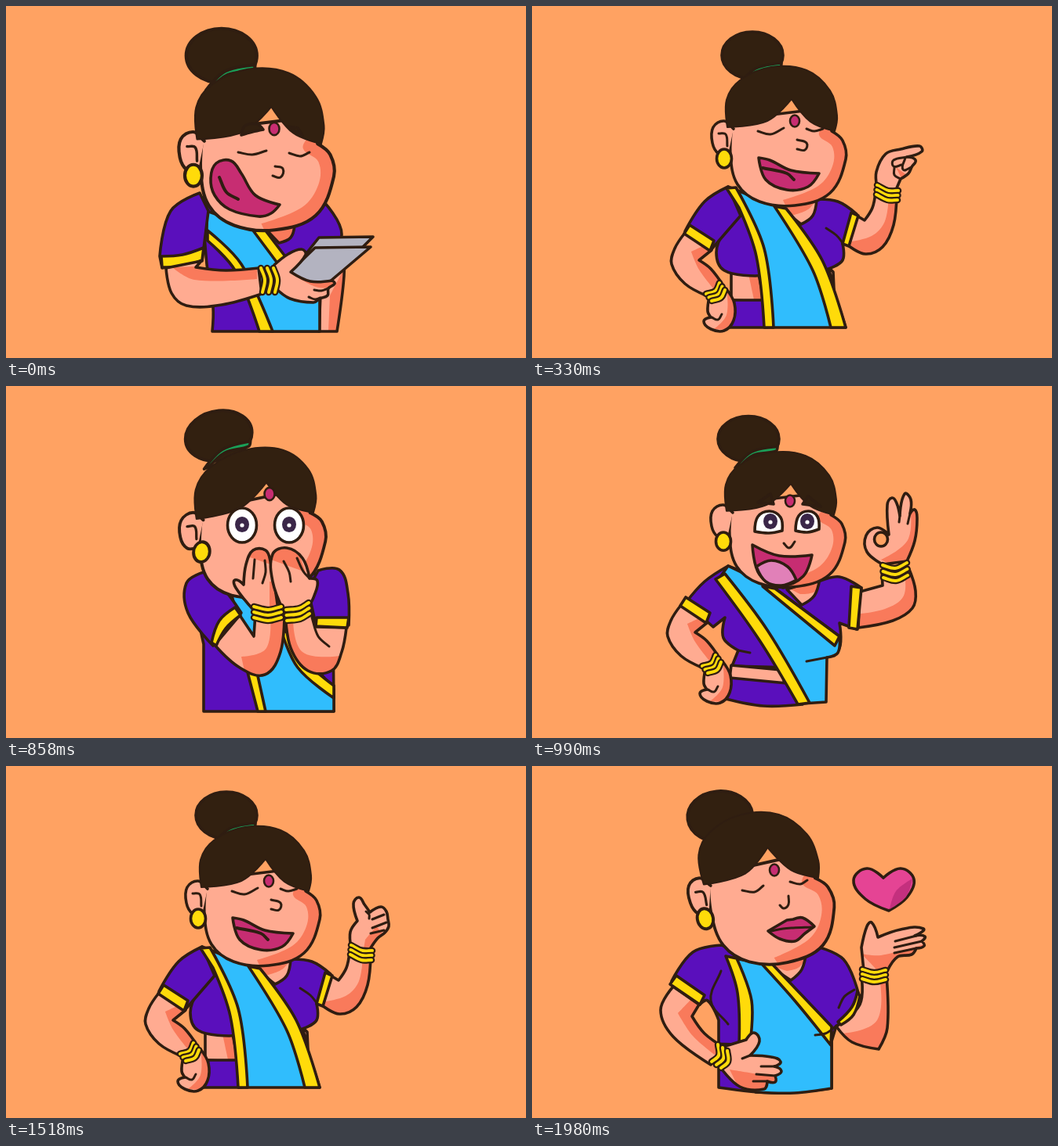
Animation of 663x450 px, one loop 2310 ms. Source, as an HTML page with a canvas:

```html
<!DOCTYPE html>
<html>
<head>
<meta charset="utf-8">
<style>
html, body { margin: 0; width: 100%; height: 100%; overflow: hidden; background: #ffa262 }
canvas { display: block }
</style>
</head>
<body>
<canvas id="stage" width="663" height="450"></canvas>
<script>
const c = document.getElementById('stage').getContext('2d');
const BG = '#ffa262', INK = '#2f1d11', HAIR = '#322010', SKIN = '#ffab91', SHADE = '#f97a5b',
  PURPLE = '#5a0fbc', BLUE = '#30bdfd', YELLOW = '#ffdb0a', MAGENTA = '#c72d72', PINK = '#e180b8',
  GREEN = '#1aa058', GREY = '#b3b3c0', WHITE = '#fff', PUPIL = '#3a2648';
const HOLD = 330, PEN = 3.6;

// Smooth curve through "x,y" points; a trailing ! makes a sharp corner.
function trace(text, closed) {
  const pts = text.split(' ').map(t => {
    const [x, y] = t.split(',').map(parseFloat);
    return { x, y, sharp: t.endsWith('!') };
  });
  const n = pts.length;
  const at = i => closed ? pts[(i + n) % n] : pts[Math.max(0, Math.min(n - 1, i))];
  const handle = (i, reach) => {
    const p = at(i), a = at(i - 1), b = at(i + 1);
    if (p.sharp) return [p.x, p.y];
    const k = reach / (Math.hypot(b.x - a.x, b.y - a.y) || 1);
    return [p.x + (b.x - a.x) * k, p.y + (b.y - a.y) * k];
  };
  const path = new Path2D();
  path.moveTo(pts[0].x, pts[0].y);
  for (let i = 0; i < (closed ? n : n - 1); i++) {
    const p = at(i), q = at(i + 1), reach = 0.35 * Math.hypot(q.x - p.x, q.y - p.y);
    path.bezierCurveTo(...handle(i, reach), ...handle(i + 1, -reach), q.x, q.y);
  }
  if (closed) path.closePath();
  return path;
}

// Filled, outlined shape with shades kept inside it.
function part(fill, text, ...shades) {
  const path = trace(text, true);
  c.fillStyle = fill;
  c.fill(path);
  c.save();
  c.clip(path);
  c.fillStyle = SHADE;
  shades.forEach(s => c.fill(trace(s, true)));
  c.restore();
  c.stroke(path);
}
const skin = (...texts) => part(SKIN, ...texts);

function line(text, width = 3, color = INK) {
  c.lineWidth = width;
  c.strokeStyle = color;
  c.stroke(trace(text));
  c.lineWidth = PEN;
  c.strokeStyle = INK;
}
const lines = (...texts) => texts.forEach(t => line(t));

function oval(fill, x, y, rx, ry, width = PEN) {
  c.beginPath();
  c.ellipse(x, y, rx, ry, 0, 0, 7);
  c.fillStyle = fill;
  c.fill();
  c.lineWidth = width;
  if (width) c.stroke();
  c.lineWidth = PEN;
}

function bangles(text, dx, dy) {
  c.save();
  for (let i = 0; i < 3; i++) {
    line(text, 8.5);
    line(text, 4, YELLOW);
    c.translate(dx, dy);
  }
  c.restore();
}

function pupil(x, y, r = 9) {
  oval(PUPIL, x, y, r, r * 1.12, 0);
  oval(WHITE, x, y + 1, 2.6, 2.6, 0);
}

const bindi = (x, y, r = 6) => oval(MAGENTA, x, y, r, r * 1.25, 2.6);

// One head, fitted to each pose by a matrix; the bun and earring can shift.
function head(matrix, bunX, bunY, { fold = true, ringX = 0 } = {}) {
  c.save();
  c.transform(...matrix);
  c.save();
  c.translate(bunX, bunY);
  oval(HAIR, 281, 63, 39, 30);
  part(GREEN, '264,101! 285,80 318,73! 316,79 288,84 270,99!');
  c.restore();
  skin('256,145! 253,190 262,228 290,250 335,255 380,239 400,196 396,172 382,160! 380,130!',
    '373,152! 366,165 383,180 383,205 365,230 320,248! 330,270! 410,250! 410,140!');
  const ear = trace('257,157 245,147 231,155 230,175 238,189 250,190');
  c.fillStyle = SKIN;
  c.fill(ear);
  c.stroke(ear);
  if (fold) line('238,163 247,164 249,179');
  oval(YELLOW, 245 + ringX, 195, 9.5, 12);
  c.lineWidth = 2;
  part(HAIR, '249,155! 248,120 265,95 305,78 350,82 380,108 389,140 386,160! 355,148 331,119! 300,147');
  c.restore();
}

function tasting() {
  skin('430,300! 431,345 422,416! 399,416! 400,350!', '434,330! 413,370! 411,416! 430,416!');
  part(PURPLE, '250,245! 256,330 264,385 263,416! 399,416! 402,345! 428,292 405,250!');
  part(BLUE, '256,262! 320,285! 400,375! 400,416! 335,416! 300,340 256,287!');
  part(YELLOW, '257,287! 300,330 340,416! 323,416! 292,338 257,300!');
  part(YELLOW, '312,283! 330,286! 362,328! 350,334!');
  part(SHADE, '330,284! 368,280! 363,296 348,303!');
  part(PURPLE, '247,239! 210,262 196,320! 199,335! 250,326! 258,262!');
  part(YELLOW, '198,320! 225,318 252,309! 250,325! 225,333 199,334!');
  skin('204,335! 211,367 230,383 275,382 326,368! 322,335! 280,338 242,334! 249,326!',
    '212,334! 240,350 320,349! 320,330!');
  part(GREY, '372,330! 399,296! 468,295! 452,311!');
  part(GREY, '361,341! 394,309! 465,308! 412,353! 380,354!');
  skin('342,331! 360,317 377,311 382,318 363,340! 388,352 416,351! 419,355 411,361 410,370 400,374 392,379 362,374 343,360!',
    '366,343! 395,359 418,360! 416,348!');
  lines('393,363 402,364 411,361', '386,372 394,375 401,373');
  bangles('325,335 330,350 327,366', 8, 0);
  head([1.155, 0, 0, 1.16, -44, -9.5], -5, 0);
  bindi(342, 157, 6.5);
  part(HAIR, '300,165! 305,153 320,151 328,158! 314,161');
  part(HAIR, '359,154! 372,156! 378,166!');
  lines('296,187 314,190 332,185', '361,188 375,192 387,187', '343,205 353,208 350,219 340,217');
  part(MAGENTA, '349,254! 318,242 300,214 287,198 268,201 261,220 266,242 285,260 322,269 338,265');
  line('272,219 281,238 296,247', 4);
}

function pointingHand() {
  skin('440,232! 439,212 451,189 470,183 494,179 497,186 478,193! 489,197 484,206 480,214 470,221! 464,235!',
    '464,206! 472,222! 460,240! 490,225!');
  lines('478,193 461,197 461,205 471,203', '484,206 473,209 476,194', '470,221 462,216 462,207');
}

function thumbHand() {
  skin('440,232! 439,212 448,198! 443,176 450,168 457,177 464,187! 478,180 485,186 487,196 488,205 483,213 474,220 464,234!',
    '472,205! 458,222! 455,240! 490,225!');
  lines('482,190 467,196', '485,200 467,207', '482,210 465,214', '459,186 463,190 463,195');
}

function hipArm() {
  skin('195,290! 182,310 178,330 195,355 224,371! 245,359! 228,336 213,325! 229,312!',
    '222,305! 203,314! 213,337 236,367! 250,360!');
  part(YELLOW, '201,280! 232,300! 227,313! 194,291!');
  skin('226,372! 224,390 228,398! 219,403 228,413 245,415 257,402 258,380 248,362!',
    '248,362! 248,395 232,413! 265,415! 265,370!');
  line('229,398 237,401 242,394');
  bangles('222,368 234,364 239,354', 3.5, 4.5);
}

function smug(hand) {
  skin('254,340! 254,376! 296,378! 288,338!', '275,338! 284,380! 296,380! 296,338!');
  part(PURPLE, '258,376! 296,376! 300,411! 250,411!');
  skin('378,334! 384,340! 385,362!');
  part(PURPLE, '250,232! 310,256! 362,247! 390,250 414,266! 396,304! 396,325 378,336! 285,345! 245,338 235,315 245,288 265,268!');
  part(PURPLE, '250,231! 220,250 195,288! 228,312! 266,268!');
  line('375,284 388,293 397,304');
  skin('313,255! 363,247! 358,268 343,279!', '310,250! 365,244! 352,260 330,268!');
  part(BLUE, '250,231! 312,256! 365,322 400,411! 297,411! 290,330 272,270!');
  part(YELLOW, '248,233! 260,232! 296,310 308,411! 296,411! 286,320 264,258!');
  part(YELLOW, '309,256! 324,259! 370,325 400,411! 381,411! 358,338');
  hipArm();
  skin('414,268! 403,306! 425,317 447,308 461,280 465,240! 438,238! 434,258 424,274!',
    '455,240! 450,275 433,294 400,302! 430,325! 475,300! 475,240!');
  part(YELLOW, '407,264! 416,268! 404,307! 396,304!');
  hand();
  bangles('440,229 454,236 467,236', -0.5, 6);
  head([1, 0, 0, 1, 0, 0], 0, 0);
  bindi(335, 147);
  lines('288,160 304,164 321,156', '350,157 360,160 371,157', '338,171 350,175 348,184 338,183');
  part(MAGENTA, '289,194! 303,197 330,210 366,214! 352,231 325,235 298,222');
  line('294,207 325,214 334,222', 4);
}

function shocked() {
  part(PURPLE, '250,240! 244,280 252,330! 252,416! 418,416! 417,300! 400,240!');
  part(BLUE, '286,260! 345,300! 418,388! 418,416! 325,416!');
  part(YELLOW, '308,366! 321,416! 331,416! 320,366!');
  part(YELLOW, '350,310! 372,360 418,399! 418,383! 380,350 358,315!');
  part(PURPLE, '252,238! 230,252 232,290 264,332! 300,290! 278,260');
  part(PURPLE, '398,236! 425,235 436,265 437,306! 395,305! 385,260!');
  skin('266,331! 298,293! 316,320! 318,290! 355,290! 350,340 330,369 298,360',
    '336,285! 332,335 300,346! 305,368! 360,368! 360,285!');
  skin('356,290! 363,335 385,364 415,364 428,340 434,309! 396,308! 388,288!',
    '354,290! 366,298! 378,340 425,345! 428,372! 360,372!');
  line('390,296 398,320 412,333');
  part(YELLOW, '292,283! 272,300 262,328! 268,332! 280,310 299,293!');
  part(YELLOW, '396,296! 437,296! 435,309! 395,307!');
  head([1.088, -0.1, 0, 1.07, -28, 29], -6, -5, { ringX: 10 });
  bindi(336, 138, 6.5);
  for (const x of [301, 361]) {
    oval(WHITE, x, 178, 18.5, 22);
    pupil(x, 177);
  }
  skin('317,288! 293,258 292,248 303,254! 306,228 315,210 331,210 337,224 347,286!',
    '336,250! 336,290! 350,288! 343,250!', '308,218! 337,228! 335,200! 305,200!');
  skin('354,288! 340,250 340,215 358,207 378,220 387,246! 397,249 393,268 385,284!',
    '338,222! 382,238! 370,203! 340,203!');
  lines('317,222 315,246', '330,223 331,238 327,252', '354,224 361,238 363,250', '371,220 379,237 387,246');
  bangles('316,282 334,286 351,282', 0, 7);
  bangles('357,286 374,284 386,277', 0.5, 7);
}

function delighted() {
  part(PURPLE, '250,230! 320,258! 365,250! 392,244 420,258! 414,311! 392,303! 392,335 375,347! 372,361! 255,358! 263,338! 244,322 246,296! 231,308! 196,277! 220,250');
  line('263,338 278,341');
  skin('254,357! 318,363! 322,381! 252,374!');
  part(PURPLE, '252,373! 325,380! 345,407! 295,409 247,400!');
  skin('325,260! 367,246! 360,268 344,280!', '320,255! 370,242! 362,262 342,266!');
  part(BLUE, '250,230! 310,259! 392,320! 390,341 376,347! 375,404! 345,406! 238,247!');
  part(YELLOW, '234,247! 246,240! 300,312 354,405! 339,407! 290,325');
  part(YELLOW, '294,256! 310,259! 392,320! 386,332!');
  line('350,352 376,347');
  c.save();
  c.translate(-5, -10);
  hipArm();
  c.restore();
  skin('418,263! 447,255! 446,236! 480,232! 489,262 485,284 460,300 416,309!',
    '474,235! 474,268 450,285 410,292! 420,320! 500,300! 495,235!');
  part(YELLOW, '407,256! 420,258! 415,311! 404,309!');
  skin('447,228! 427,212 426,191 440,181 455,190! 453,152 459,143 465,150 469,166! 475,138 483,145 482,163! 488,158 491,170 488,198 478,224!',
    '480,140! 480,195 445,222! 470,235! 500,210! 500,140!');
  oval(BG, 445, 196, 8.5, 9);
  lines('469,166 468,174', '482,163 479,176');
  bangles('447,229 463,233 478,226', 0.5, 8);
  head([1, 0, 0, 0.97, -1, 9.5], -4, -3, { fold: false });
  bindi(329, 147);
  part(HAIR, '288,149! 304,138! 308,151!');
  part(HAIR, '345,151! 352,141! 368,154!');
  part(WHITE, '284,186! 288,167 303,160 317,168 319,185! 302,188');
  part(WHITE, '336,185! 340,166 353,160 364,167 366,183! 351,187');
  pupil(304, 173);
  pupil(351, 173);
  line('321,201 328,207 335,199');
  part(MAGENTA, '281,203! 315,217 357,216! 346,243 318,255 290,241');
  part(PINK, '286,231! 305,223 326,231 337,248! 318,255 298,250');
}

function alarmed() {
  skin('194,290! 175,345 168,407! 207,407! 215,360 239,316!', '218,308! 195,350 187,410! 215,410! 245,315!');
  part(PURPLE, '240,232! 312,264! 365,260! 395,242 425,232! 432,277! 404,282! 410,315 400,345! 405,407! 250,407! 255,345! 246,325 241,316! 210,305 189,286! 210,252');
  line('246,287 243,325 263,345');
  skin('318,265! 375,250! 366,274 347,284!', '310,260! 380,245! 365,275 350,275!');
  part(BLUE, '247,230! 314,264! 402,345! 403,407! 330,407! 290,315 232,245!');
  part(YELLOW, '230,243! 243,235! 300,315 340,405! 326,407! 286,318');
  part(YELLOW, '308,264! 322,265! 401,342! 400,362!');
  skin('426,233! 436,222 436,185! 472,183! 470,250 457,270 433,277!',
    '457,180! 455,235 430,262! 440,285! 480,265! 480,180!');
  part(YELLOW, '412,236! 424,232! 434,275! 422,280!');
  skin('441,170! 433,144! 419,142 413,133 438,131! 430,100 436,95 443,104 449,122! 457,98 465,92 471,100 471,118! 485,98 494,102 491,140 474,172!',
    '489,95! 483,140 445,166! 470,180! 500,160! 500,95!');
  lines('449,122 451,127', '471,118 467,126', '437,131 443,138');
  bangles('438,170 456,175 476,170', -0.5, 8);
  head([1.14, -0.145, 0.1335, 1.058, -66, 43], -13, 11, { fold: false });
  bindi(321, 136, 7);
  oval(WHITE, 294, 170, 14, 18);
  oval(WHITE, 356, 153, 13, 17);
  pupil(294, 170, 7);
  pupil(356, 153, 7);
  line('331,164 338,174 333,182 328,179');
  part(MAGENTA, '328,190! 350,188 366,197 377,220 376,247 350,253 320,254 305,247 308,222');
  part(WHITE, '319,201! 330,191 350,190 368,202! 340,208');
  part(PINK, '312,249! 328,230 355,223 376,236! 374,250 340,253');
}

function kissing() {
  part(PURPLE, '242,229! 300,253! 360,230! 397,247 416,290! 412,320! 388,332! 382,352! 382,412! 310,418 238,411! 238,325! 224,300 214,305! 178,275! 205,238');
  line('241,262 228,300 250,330');
  skin('300,254! 350,235! 344,260 330,274!', '295,252! 355,230! 342,256 325,262!');
  part(BLUE, '258,246! 298,253! 382,340! 382,412! 335,418 285,417! 272,350! 273,290');
  part(YELLOW, '247,243! 261,246! 280,300 278,355! 264,357! 262,290');
  part(YELLOW, '292,252! 306,253! 382,333! 381,357! 335,300');
  lines('361,344 374,342 387,333', '411,286 398,295 391,309', '238,355 266,356');
  skin('180,282! 164,312 180,346 228,382! 245,360! 220,342 204,320! 213,305!',
    '206,295! 186,316! 205,345 234,370! 250,360!');
  part(YELLOW, '184,268! 220,293! 214,305! 176,279!');
  skin('247,358! 273,350! 283,341 290,352 278,370! 305,372 317,378 309,384! 318,390 310,396! 310,404 300,403! 296,413 265,410 240,385!',
    '252,388! 312,398! 300,418! 265,415!');
  lines('292,384 310,384', '286,394 310,396', '282,403 300,403', '278,370 268,374');
  bangles('229,378 238,370 237,356', 6, 4);
  skin('420,268! 418,305 388,333! 408,353 442,362! 453,335 452,268!',
    '442,265! 440,325 395,342! 440,375! 465,350! 465,265!');
  part(YELLOW, '390,327! 408,308 415,288! 418,294! 410,318 394,331!');
  skin('423,262! 420,232! 427,205 433,200 441,219! 470,209 499,208 488,217! 501,218 497,224! 500,230 490,233! 484,241 466,244 453,262!',
    '420,240! 445,242 500,228! 480,250! 444,265!');
  lines('463,224 490,217', '462,232 497,224', '462,239 490,233');
  bangles('421,260 436,264 451,261', 0, 6);
  part('#e54494', '455,185! 425,170 410,146 427,131 448,143! 470,131 487,145 478,168');
  c.fillStyle = '#c4307e';
  c.fill(trace('485,144! 464,160 456,183! 477,167', true));
  head([1.06, -0.1025, 0.155, 1.084, -69, 9], -1, 15);
  bindi(309, 133);
  lines('268,159 284,161 295,153', '329,148 342,151 351,146', '327,166 327,177 321,182 316,178');
  part(MAGENTA, '301,211! 325,197! 333,196! 345,194 360,205! 348,214 335,224 316,221');
  line('304,211 320,208 333,207 356,206');
}

const poses = [tasting, () => smug(pointingHand), shocked, delighted, () => smug(thumbHand), alarmed, kissing];

function draw() {
  const pose = Math.floor(performance.now() / HOLD) % poses.length;
  c.fillStyle = BG;
  c.fillRect(0, 0, 663, 450);
  c.strokeStyle = INK;
  c.lineWidth = PEN;
  c.lineJoin = c.lineCap = 'round';
  poses[pose]();
  requestAnimationFrame(draw);
}
draw();
</script>
</body>
</html>
```
